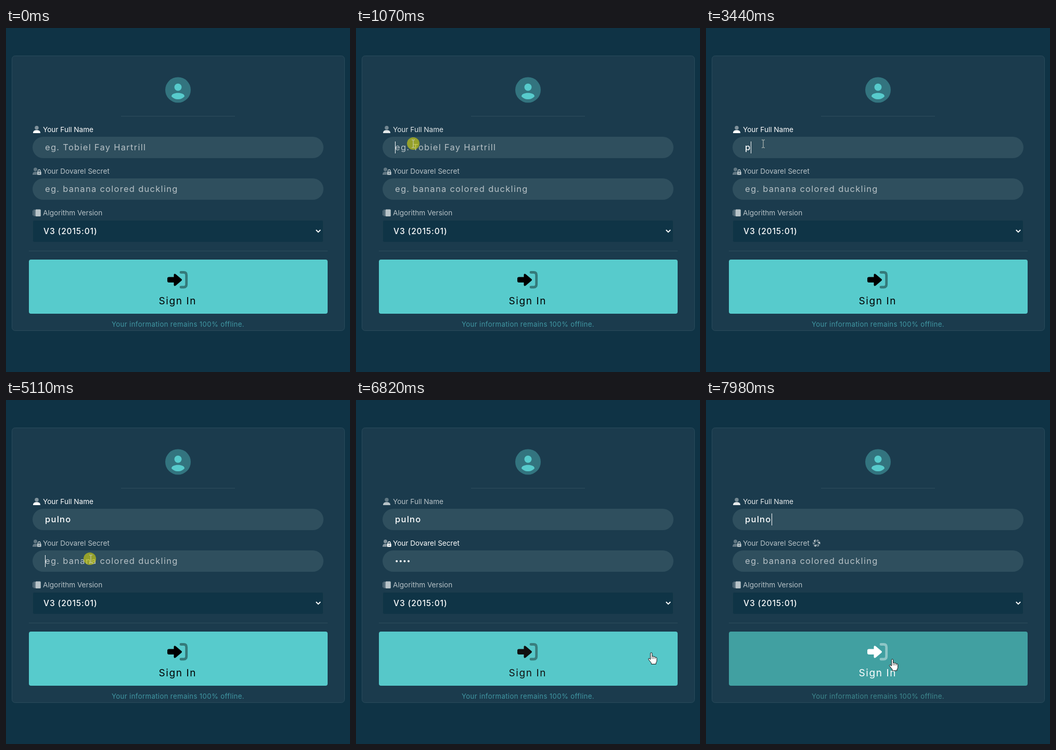
Animation of 661x661 px, one loop 8000 ms. Source, as an HTML page:

```html
<!DOCTYPE html>
<html lang="en">
<head>
<meta charset="utf-8">
<title>Sign in</title>
<style>
  html, body { margin: 0; width: 100%; height: 100%; overflow: hidden; background: #0f3345; }
  svg { display: block; width: 100vw; height: 100vh; }
  text { font-family: Inter, "Open Sans", sans-serif; white-space: pre; }
  .label text { font-size: 13.6px; fill: currentColor; }
  .label { color: #b8c3c8; fill: currentColor; }
  .hint, .value { font-size: 16.5px; letter-spacing: 1.28px; }
  .hint { fill: #b7c1c6; }
  .value { fill: #fff; font-weight: 500; }
  .select { font-size: 15.5px; letter-spacing: .9px; font-weight: 500; fill: #fff; }
  .field { fill: #2f4f5e; }
  .rule { stroke: #2f4e5d; }
  .dim { opacity: .45; }
</style>
</head>
<body>
<svg viewBox="0 0 661 661">
  <rect x="11.5" y="53.5" width="639" height="528" rx="6" fill="#1b3b4d" stroke="#2a4b5b"/>
  <circle cx="330.5" cy="119" r="24.5" fill="#33747f"/>
  <g fill="#57cbcc">
    <circle cx="330.5" cy="113.8" r="7"/>
    <path d="M318 131.5C318 127 324 124.8 330.5 124.8S343 127 343 131.5C340 135 336 137 330.5 137S321 135 318 131.5Z"/>
  </g>
  <path class="rule" d="M221 169.5H440M44 428.5H618"/>

  <g class="label" id="nameLabel">
    <circle class="dim" cx="59" cy="191.8" r="3.7"/>
    <path d="M52 202C52 198 54.5 196.3 59 196.3S66 198 66 202Z"/>
    <text x="71" y="200">Your Full Name</text>
  </g>
  <rect class="field" x="51" y="209" width="559" height="41" rx="20.5"/>
  <text class="hint" id="nameHint" x="75" y="235">eg. Tobiel Fay Hartrill</text>
  <text class="value" id="name" x="75" y="235"></text>

  <g class="label" id="secretLabel">
    <g class="dim">
      <circle cx="56.5" cy="271.8" r="3.5"/>
      <path d="M51 282C51 278 53 276.3 56.5 276.3H59V282Z"/>
    </g>
    <rect x="59.7" y="276" width="8" height="6.3" rx="1"/>
    <path d="M61.5 277V274.5A2.2 2.2 0 0 1 65.9 274.5V277" fill="none" stroke="currentColor" stroke-width="1.4"/>
    <circle cx="63.7" cy="279" r="1" fill="#1b3b4d"/>
    <text x="71" y="280">Your Dovarel Secret</text>
    <g id="spinner"></g>
  </g>
  <rect class="field" x="51" y="289" width="559" height="41" rx="20.5"/>
  <text class="hint" id="secretHint" x="75" y="315">eg. banana colored duckling</text>
  <g id="dots" fill="#fff"></g>

  <g class="label">
    <path class="dim" d="M51 350.5H52.3V360H51ZM53.2 349H55.6V361.5H53.2Z"/>
    <rect x="56.4" y="348.5" width="10.4" height="13.5" rx="1.6"/>
    <text x="71" y="360">Algorithm Version</text>
  </g>
  <rect id="select" x="51.5" y="369.5" width="558" height="42" rx="3" fill="#0f3446"/>
  <text class="select" x="72" y="396">V3 (2015:01)</text>
  <path d="M595.8 388L600 392.2L604.2 388" fill="none" stroke="#fff" stroke-width="2"/>

  <rect id="button" x="44" y="445" width="574" height="104" rx="4"/>
  <g id="face" fill="currentColor">
    <path d="M313 478.5H322.5V474Q323 471 326 473L337 482.3Q339 484 337 485.7L326 495Q323 497 322.5 494V489H313Q310 489 310 486V481.5Q310 478.5 313 478.5Z"/>
    <path d="M336 469.5H341.5Q346.7 469.5 346.7 475V492.5Q346.7 498 341.5 498H336" fill="none" stroke="currentColor" stroke-width="4.8" stroke-linecap="round" opacity=".4"/>
    <text x="293.5" y="531" font-size="19" letter-spacing="1.6">Sign In</text>
  </g>
  <text id="note" x="203" y="574" font-size="13.2" letter-spacing=".36">Your information remains 100% offline.</text>

  <rect id="caret" width="1" height="23" fill="#fff"/>
  <circle id="click" r="12" fill="#cdcd0f" fill-opacity=".65"/>
  <g id="arrow">
    <path d="M0 0V16.5L3.9 13L6.4 18.8L9 17.7L6.5 12H11.8Z" fill="#fff" stroke="#111" stroke-width=".9"/>
  </g>
  <g id="beam">
    <path d="M-3 -7H-.8L0 -6.2L.8 -7H3M0 -6.2V7.2M-3 8H-.8L0 7.2L.8 8H3" fill="none" stroke="#ccd0c8" stroke-width="1"/>
  </g>
  <g id="hand">
    <path d="M-1.6 1.5Q-1.6 0 0 0T1.6 1.5V7Q3.8 6 4.7 7.7Q7 7 7.7 8.8Q10.6 8.2 10.7 11V15.5Q10.7 18 9 19.5V22H0V19.8L-5 13.5Q-6.5 11 -4.2 10.8L-1.6 13Z" fill="#fff" stroke="#111" stroke-width="1"/>
    <path d="M1.6 7V12M4.7 8V12M7.7 9V12" stroke="#111" stroke-width=".8"/>
  </g>
</svg>
<script>
const LOOP = 8000, STEP = 67;
const USER = "pulno";
const userKeys = [3440, 3530, 3630, 3840, 3900];
const dotKeys = [5540, 5730, 5880, 6010];
const RESET = 7840;

// [time, level]
const fades = {
  name: [[70, 1], [270, 0], [880, 0], [1200, 1], [5110, 1], [5400, 0], [RESET, 0], [8000, .75]],
  secret: [[5110, 0], [5400, 1], [7800, 1], [7960, 0]],
  select: [[200, 0], [400, 1], [540, .95], [740, 0]],
  button: [[6750, 0], [6820, .06], [7110, 1]],
  note: [[RESET, 0], [7980, 1]]
};

// [time, x, y]; each move ends hidden or holds until the given time
const moves = [
  { end: 3530, path: [[70, 603, 635], [137, 420, 405], [204, 290, 380], [338, 130, 310],
    [473, 70, 270], [540, 65, 267], [674, 80, 238], [800, 110, 222]] },
  { end: 5540, path: [[4580, 110, 222], [4720, 125, 250], [4850, 150, 290], [4950, 163, 305]] },
  { end: LOOP, path: [[6540, 163, 305], [6610, 300, 360], [6680, 470, 430], [6750, 550, 475],
    [6800, 572, 485], [6960, 480, 495], [7160, 358, 498]] }
];
const clicks = [[880, 1080, 110, 222], [5040, 5200, 161, 305], [7700, RESET, 358, 498]];
const nameCaret = [[950, 1490], [2020, 2550], [3010, 4430], [RESET, LOOP]];
const secretCaret = [[5100, 6540], [7070, 7630]];

const $ = id => document.getElementById(id);
const within = (t, [a, b]) => t >= a && t < b;
const count = (keys, t) => keys.filter(k => t >= k).length;
const show = (el, on) => el.setAttribute("visibility", on ? "visible" : "hidden");
const place = (el, x, y) => el.setAttribute("transform", `translate(${x} ${y})`);

function sample(keys, t) {
  if (t <= keys[0][0]) return keys[0].slice(1);
  for (let i = 1; i < keys.length; i++) {
    const [a, ...from] = keys[i - 1], [b, ...to] = keys[i];
    if (t < b) return from.map((v, j) => v + (to[j] - v) * (t - a) / (b - a));
  }
  return keys[keys.length - 1].slice(1);
}

const level = (id, t) => sample(fades[id], t)[0];
const mix = (a, b, k) => `rgb(${a.map((v, i) => Math.round(v + (b[i] - v) * k))})`;

function add(parent, tag, attrs) {
  const el = document.createElementNS("http://www.w3.org/2000/svg", tag);
  for (const k in attrs) el.setAttribute(k, attrs[k]);
  return parent.appendChild(el);
}

const dots = dotKeys.map((_, i) => add($("dots"), "circle", { cx: 78.2 + 7.6 * i, cy: 309.7, r: 2 }));
for (let i = 0; i < 6; i++)
  add($("spinner"), "path", {
    d: "M-1 -2.6L2.3 -6.8A7.2 7.2 0 0 1 6.2 -3.6Z",
    transform: `rotate(${i * 60})`, opacity: i % 2 ? .6 : 1
  });

function drawPointer(t) {
  const move = moves.find(m => within(t, [m.path[0][0], m.end]));
  let kind = "";
  if (move) {
    const start = move.path[0][0];
    const [x, y] = sample(move.path, start + Math.floor((t - start) / STEP) * STEP);
    const inside = (top, bottom) => y > top && y < bottom && x > 51 && x < 610;
    kind = inside(209, 250) || inside(289, 330) ? "beam" : inside(445, 549) ? "hand" : "arrow";
    place($(kind), x, y);
  }
  for (const id of ["arrow", "beam", "hand"]) show($(id), id === kind);
  const click = clicks.find(c => within(t, c));
  show($("click"), click);
  if (click) place($("click"), click[2], click[3]);
}

function draw(t) {
  const typed = count(userKeys, t);
  const masked = t < RESET ? count(dotKeys, t) : 0;
  $("name").textContent = USER.slice(0, typed);
  show($("nameHint"), !typed);
  show($("secretHint"), !masked);
  dots.forEach((d, i) => show(d, i < masked));

  const grey = [184, 195, 200], white = [255, 255, 255];
  $("nameLabel").style.color = mix(grey, white, level("name", t));
  $("secretLabel").style.color = mix(grey, white, level("secret", t));
  $("select").setAttribute("stroke", mix([28, 59, 76], [67, 97, 110], level("select", t)));
  const hover = level("button", t);
  $("button").setAttribute("fill", mix([87, 203, 204], [65, 160, 161], hover));
  $("face").style.color = mix([0, 0, 0], white, hover);
  $("note").setAttribute("fill", mix([64, 151, 163], [62, 137, 143], level("note", t)));

  show($("spinner"), t >= RESET);
  $("spinner").setAttribute("transform", `translate(212.3 275) rotate(${(t - RESET) * .36})`);

  const inName = nameCaret.some(r => within(t, r));
  const inSecret = secretCaret.some(r => within(t, r));
  show($("caret"), inName || inSecret);
  if (inName) place($("caret"), Math.round(75 + (typed ? $("name").getComputedTextLength() : 0)), 218);
  else if (inSecret) place($("caret"), Math.round(75 + 7.6 * masked), 298);

  drawPointer(t);
}

const begin = performance.now();
function tick() {
  draw((performance.now() - begin) % LOOP);
  requestAnimationFrame(tick);
}
tick();
</script>
</body>
</html>
```
